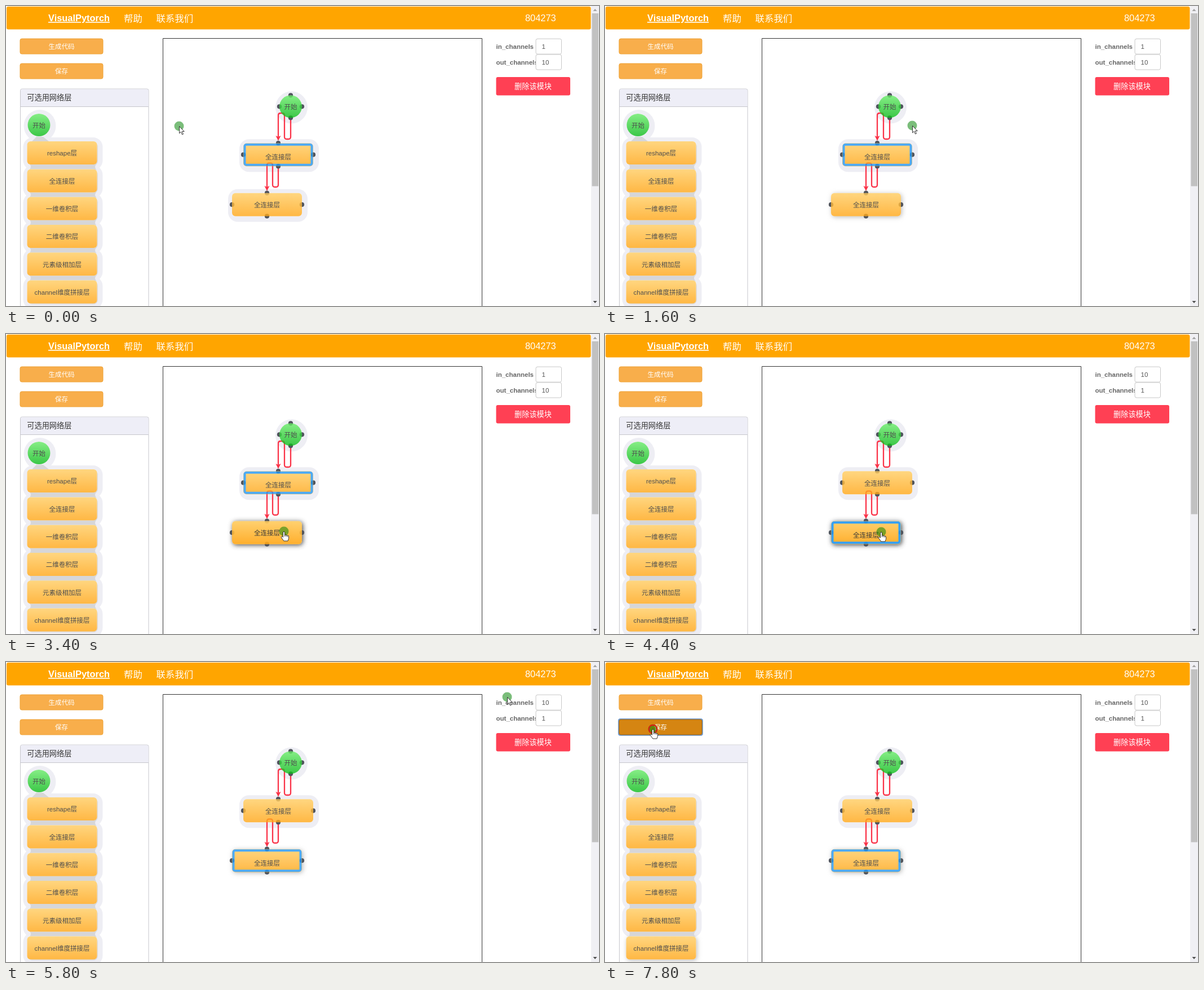
An HTML page for the animation above (8 s loop, 1052 by 532 pixels).

```html
<!DOCTYPE html>
<html lang="zh-CN">
<head>
<meta charset="utf-8">
<title>VisualPytorch</title>
<style>
  html, body { margin: 0; width: 100%; height: 100%; overflow: hidden; background: #fff; }
  svg { display: block; width: 1052px; height: 532px; }
  text { font-family: "Liberation Sans", "Noto Sans CJK SC", "Noto Sans CJK", sans-serif; font-size: 11.5px; fill: #222; }
  .mid { text-anchor: middle; }
  .nav { font-size: 16.4px; fill: #fff; }
  .white { fill: #fff; }
  .label { font-weight: bold; fill: #666; }
  .value { fill: #555; }
  .link { fill: none; stroke: #fa3348; stroke-width: 2.3; }
  .body { opacity: .8; }
</style>
</head>
<body>
<svg viewBox="0 0 1052 532">
  <defs>
    <linearGradient id="orange" x2="0" y2="1">
      <stop stop-color="#ffcc60"/><stop offset="1" stop-color="#ffa616"/>
    </linearGradient>
    <linearGradient id="green" x2="0" y2="1">
      <stop stop-color="#68ea68"/><stop offset="1" stop-color="#0bba1a"/>
    </linearGradient>
    <filter id="blur" x="-30%" y="-60%" width="160%" height="220%"><feGaussianBlur stdDeviation="4"/></filter>
  </defs>

  <rect width="1052" height="532" fill="#fff"/>
  <rect x="1" y="1" width="1036.500" height="40.500" rx="3" fill="#ffa500"/>
  <text class="nav" x="75" y="27" font-weight="bold" text-decoration="underline">VisualPytorch</text>
  <text class="nav" x="209" y="27.500">帮助</text>
  <text class="nav" x="266.500" y="27.500">联系我们</text>
  <text class="nav" x="921" y="27">804273</text>

  <rect x="1038" width="14" height="532" fill="#f0f0f4"/>
  <rect x="1039.500" y="13" width="11.500" height="306.500" fill="#c1c1c1"/>
  <path d="M1041.500 9l3.500-4 3.500 4z" fill="#a3a3a3"/>
  <path d="M1041.500 523l3.500 4 3.500-4z" fill="#505050"/>

  <rect x="25" y="58" width="147" height="27" rx="3" fill="#f8ae4b" stroke="#eea236"/>
  <text class="mid white" x="98.500" y="75.700">生成代码</text>
  <rect id="saveGlow" x="24" y="101" width="149" height="29" rx="3" fill="none" stroke="#5b8fd0" stroke-width="1.500"/>
  <rect id="save" x="25" y="102" width="147" height="27" rx="3"/>
  <text class="mid white" x="98.500" y="119.900">保存</text>

  <path d="M25.500 532V150q0-3 3-3H250q3 0 3 3V532" fill="#fff" stroke="#c6c6cc"/>
  <path d="M26 178V150q0-2.500 2.500-2.500H250q2.500 0 2.500 2.500V178z" fill="#eeeef7"/>
  <path d="M25 178.500H253" stroke="#c6c6cc"/>
  <text x="37.300" y="167.300" style="font-size:13.200px;fill:#333">可选用网络层</text>

  <path d="M278.500 532V57.500H844.500V532" fill="none" stroke="#333"/>
  <g id="halos"></g>
  <g id="links"></g>
  <g id="dots" fill="#50545c"></g>
  <g id="bodies"></g>

  <text class="label" x="869.500" y="75.500">in_channels</text>
  <text class="label" x="869.500" y="103.500">out_channels</text>
  <g fill="#fff" stroke="#c8c8c8">
    <rect x="940" y="58.200" width="45.500" height="27" rx="3"/>
    <rect x="940" y="86" width="45.500" height="27" rx="3"/>
  </g>
  <text id="inValue" class="value" x="950.500" y="75.700"></text>
  <text id="outValue" class="value" x="950.500" y="103.700"></text>
  <rect x="869.500" y="126" width="131.500" height="32.500" rx="3" fill="#ff4054"/>
  <text class="mid white" x="935" y="147" style="font-size:13.200px">删除该模块</text>

  <g id="cursor">
    <circle r="8.500" fill="#008000" fill-opacity=".52"/>
    <circle id="ring" r="7.300" fill="none" stroke="#e3141a" stroke-width="2"/>
    <path id="arrow" d="M.5.500V12.800L3.400 10.200 5.500 15 7.500 14.100 5.400 9.500H9.200z" fill="#fff" stroke="#222" stroke-width=".9"/>
    <path id="hand" d="M-1.500 2Q-1.500.4 0 .4T1.500 2V6.500Q3 5.300 4 6.800 5.600 6 6.300 7.500 8.500 7 8.500 9.200V12.500L7 17H-.2L-4.600 10.800Q-5 8.900-3.200 8.900L-1.500 10.300zM1.500 6.500V9M4 7V9.300M6.300 7.600V9.700" fill="#fff" stroke="#222" stroke-width=".9"/>
  </g>
</svg>
<script>
const LOOP = 8000, FC = '全连接层';
const $ = id => document.getElementById(id);

function add(parent, tag, attrs, text) {
  const el = document.createElementNS('http://www.w3.org/2000/svg', tag);
  for (const k in attrs) el.setAttribute(k, attrs[k]);
  if (text) el.textContent = text;
  return parent.appendChild(el);
}
const show = (el, on) => el.setAttribute('visibility', on ? 'visible' : 'hidden');
const inside = (x, y, b) => x >= b.x && x <= b.x + b.w && y >= b.y && y <= b.y + b.h;

function makeNode(cx, cy, label, round) {
  const w = round ? 40 : 124, h = round ? 40 : 41, x = cx - w / 2, y = cy - h / 2;
  const rx = round ? 20 : 6;
  const halo = add($('halos'), 'g');
  const flat = add(halo, 'rect', { x: x - 7, y: y - 7, width: w + 17, height: h + 17, rx: round ? 29 : 17, fill: '#eeeef4' });
  const shadow = add(halo, 'rect', { x: x + 1.6, y: y + 1.6, width: w, height: h, rx, filter: 'url(#blur)' });
  const body = add($('bodies'), 'g', { class: 'body' });
  add(body, 'rect', { x, y, width: w, height: h, rx, fill: `url(#${round ? 'green' : 'orange'})` });
  const border = add(body, 'rect', { x: x + 2.5, y: y + 2.5, width: w - 5, height: h - 5, rx: 3, fill: 'none', stroke: '#2096f5', 'stroke-width': 4 });
  const text = add(body, 'text', { class: 'mid', x: cx, y: cy + 4.8 }, label);
  const node = {
    x, y, w, h, flat,
    setHalo(mode) {
      show(flat, mode === 'flat');
      show(shadow, mode !== 'flat');
      shadow.setAttribute('fill', mode === 'hover' ? '#444' : '#bbb');
      body.style.opacity = mode === 'hover' ? .9 : .8;
    },
    select(on) {
      show(border, on);
      text.setAttribute('y', cy + (on ? 8.4 : 4.8));
    }
  };
  node.setHalo('flat');
  node.select(false);
  return node;
}

const whiten = n => add($('halos'), 'rect', { x: n.x, y: n.y, width: n.w, height: n.h, rx: n.w < 50 ? 20 : 6, fill: '#fff' });

function addDots(n) {
  const cx = n.x + n.w / 2, cy = n.y + n.h / 2;
  for (const [x, y] of [[cx, n.y], [n.x, cy], [n.x + n.w, cy], [cx, n.y + n.h]])
    add($('dots'), 'circle', { cx: x, cy: y, r: 4.1 });
}

// Elbow link: down from (x, y), left, up and over, then down to the arrow tip.
function addLink(x, y, low, high, mid, end, tip) {
  add($('links'), 'path', { class: 'link', d: `M${x} ${y}V${low - 4}q0 4-4 4H${mid + 4}q-4 0-4-4V${high + 4}q0-4-4-4H${end + 4}q-4 0-4 4V${tip - 4}` });
  add($('links'), 'path', { fill: '#fa3348', d: `M${end} ${tip + 1}l-4.500-9 4.500 2 4.500-2z` });
}

// Palette
const palette = [makeNode(58.5, 211, '开始', true)];
['reshape层', FC, '一维卷积层', '二维卷积层', '元素级相加层', 'channel维度拼接层']
  .forEach((name, i) => palette.push(makeNode(99.5, 260.6 + i * 49.3, name)));
add($('halos'), 'path', { d: 'M46 240L54 232H66L76 240z', fill: '#d6d6d8' });
palette.slice(1).forEach((n, i) => {
  add($('halos'), 'rect', { x: n.x + 1.5, y: n.y + 1.5, width: n.w, height: n.h, rx: 8, fill: '#d9d9dc' });
  if (i < 5) add($('halos'), 'path', { d: `M${n.x + 4} ${n.y + n.h - 1}q5 5 0 10.500H${n.x + n.w - 1}q-5-5 0-10.500z`, fill: '#d6d6d8' });
});
palette.forEach(whiten);

// Graph
const start = makeNode(505, 178.3, '开始', true);
const first = makeNode(483, 263.7, FC);
const second = makeNode(463, 352.2, FC);
[start, first, second].forEach(n => { whiten(n); addDots(n); });
addLink(505, 198, 236, 190, 494, 483, 238);
addLink(483, 284, 321, 278.5, 473, 463, 327);

const saveBox = { x: 25, y: 102, w: 147, h: 27 };
const channel = palette[6];

// time, x, y
const moves = [
  [0, 307, 213], [400, 318, 223], [600, 360, 262], [800, 420, 322], [1000, 460, 361],
  [1200, 535, 305], [1400, 590, 200],
  [1600, 545, 212], [1800, 483, 318], [2000, 600, 327], [2200, 816, 300], [2400, 785, 272],
  [2600, 641, 308], [2800, 565, 292], [3000, 522, 338], [3200, 502, 348], [3400, 493, 350],
  [3800, 490, 351], [4800, 508, 338], [5000, 575, 289], [5200, 685, 210], [5400, 800, 126],
  [5600, 865, 80], [5800, 889, 62],
  [6000, 967, 24], [6200, 100, 505], [6400, 12, 300], [6600, 279, 118], [6800, 110, 118],
  [7000, 86, 119], [7200, 85, 119]
];

function haloMode(node, past, x, y) {
  if (inside(x, y, node)) return 'hover';
  return past.some(m => inside(m[1], m[2], node)) ? 'soft' : 'flat';
}

function render(t) {
  const past = moves.filter(m => m[0] <= t);
  const [, x, y] = past[past.length - 1];
  const chosen = t >= 4400, saving = t >= 7800;
  const overSave = inside(x, y, saveBox);

  second.setHalo(haloMode(second, past, x, y));
  channel.setHalo(haloMode(channel, past, x, y));
  first.select(!chosen);
  second.select(chosen);
  $('inValue').textContent = chosen ? '10' : '1';
  $('outValue').textContent = chosen ? '1' : '10';

  $('save').setAttribute('fill', saving ? '#d58512' : overSave ? '#ec971f' : '#f8ae4b');
  $('save').setAttribute('stroke', saving ? '#985f0d' : overSave ? '#d58512' : '#eea236');
  show($('saveGlow'), saving);

  const hand = overSave || inside(x, y, second) || inside(x, y, channel) || (t >= 6600 && t < 6800);
  $('cursor').setAttribute('transform', `translate(${x} ${y})`);
  show($('hand'), hand);
  show($('arrow'), !hand);
  show($('ring'), (t >= 4200 && t < 4400) || t >= 7400);
}

const begin = performance.now();
function tick() {
  render((performance.now() - begin) % LOOP);
  requestAnimationFrame(tick);
}
tick();
</script>
</body>
</html>
```
